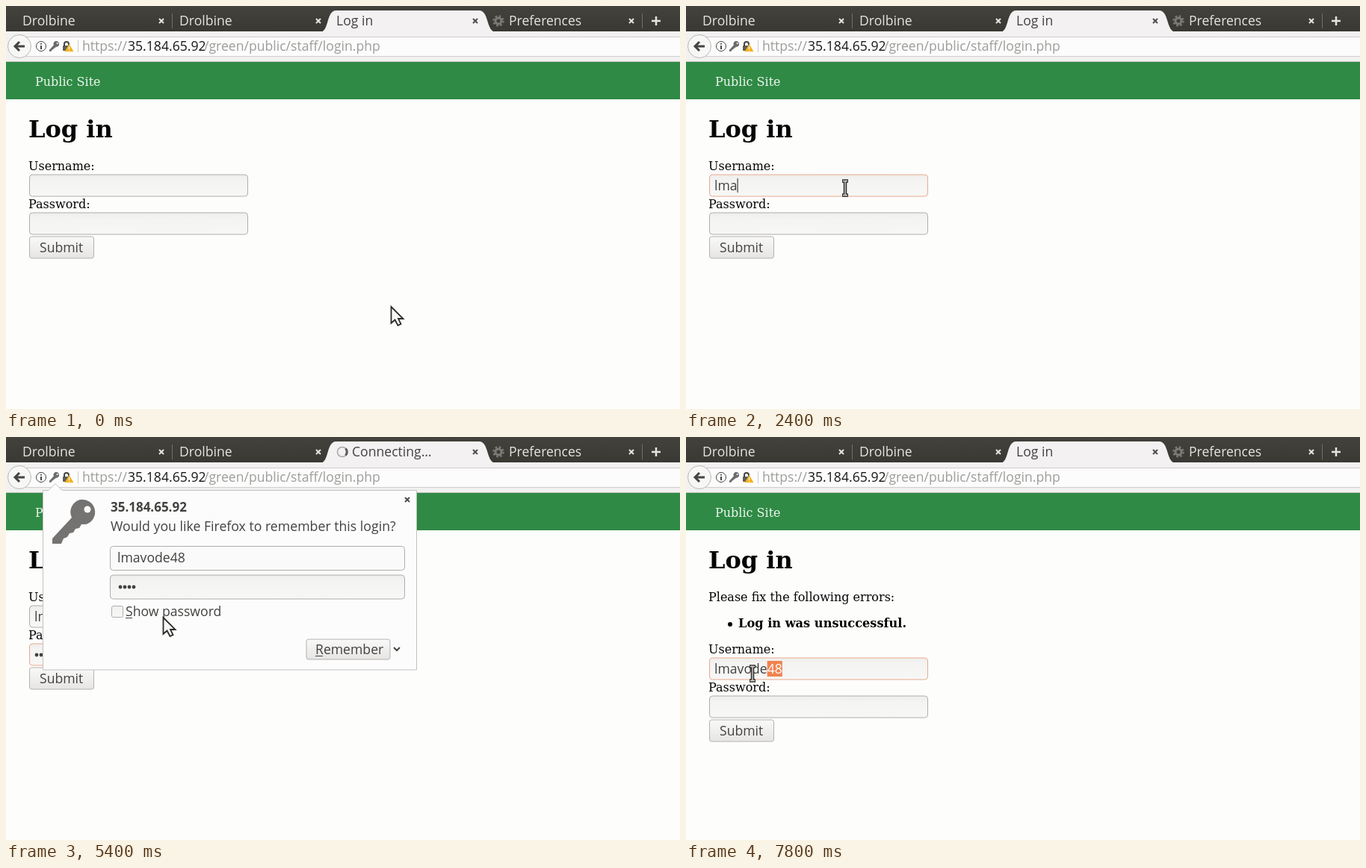
Write an HTML page that moves like this. It is 902 by 540 pixels and loops after 8 s.

```html
<!DOCTYPE html>
<html lang="en">
<head>
<meta charset="utf-8">
<title>Log in</title>
<style>
  html, body { margin: 0; width: 100%; height: 100%; overflow: hidden; background: #fdfdfc; }
  svg { display: block; width: 902px; height: 540px; }
  text { white-space: pre; }
  .ui { font: 17.6px "Open Sans", "Noto Sans", sans-serif; fill: #434240; }
  .page { font: 16px "DejaVu Serif", "Noto Serif", serif; fill: #050505; }
  .bold { font-weight: bold; }
  .light { fill: #e6e4df; }
  .faint { fill: #9e9d9a; }
  .box { fill: url(#fieldFill); stroke: #b0aeab; }
  .focus { stroke: #eaa98b; }
  .button { fill: url(#buttonFill); stroke: #b5b3b0; }
  .line { fill: none; stroke: #454442; stroke-width: 2; }
  .thin { stroke-width: 1; }
  .thick { stroke-width: 3; }
</style>
</head>
<body>
<svg viewBox="0 0 902 540">
  <defs>
    <linearGradient id="barFill" x2="0" y2="1">
      <stop stop-color="#43423c"/><stop offset="1" stop-color="#393833"/>
    </linearGradient>
    <linearGradient id="toolFill" x2="0" y2="1">
      <stop stop-color="#f3f1f2"/><stop offset="1" stop-color="#f2f1f0"/>
    </linearGradient>
    <linearGradient id="fieldFill" x2="0" y2="1">
      <stop stop-color="#eeeeec"/><stop offset=".3" stop-color="#f4f4f3"/><stop offset="1" stop-color="#f7f7f6"/>
    </linearGradient>
    <linearGradient id="buttonFill" x2="0" y2="1">
      <stop stop-color="#f9f9f8"/><stop offset="1" stop-color="#e6e5e3"/>
    </linearGradient>
    <path id="cross" d="M-3 -3L3 3M3 -3L-3 3"/>
    <g id="keyShape">
      <path d="M6 -30A17 17 0 0 1 14 3L8 3L5 8L0 9L-3 14L-8 15L-11 20L-16 22L-19 29H-31V22L-5 -6A17 17 0 0 1 6 -30Z"/>
      <circle cx="16" cy="-17" r="4.500" fill="#fcfcfc"/>
    </g>
  </defs>

  <rect width="902" height="540" fill="#fdfdfc"/>

  <!-- Tab strip -->
  <rect width="902" height="35" fill="url(#barFill)"/>
  <path d="M420 35C433 35 428 6 442 6H633C647 6 642 35 656 35Z" fill="#f3f1f2"/>
  <path d="M222.500 10V30M851.500 10V30" stroke="#6f6e69"/>
  <g class="ui">
    <text class="light" x="22" y="26">Drolbine</text>
    <text class="light" x="232" y="26">Drolbine</text>
    <text id="tabTitle" y="26"></text>
    <text class="light" x="673" y="26">Preferences</text>
  </g>
  <g stroke="#e6e4df" stroke-width="2">
    <use href="#cross" x="208" y="20"/>
    <use href="#cross" x="418" y="20"/>
    <use href="#cross" x="837" y="20"/>
    <use href="#cross" x="628" y="20" stroke="#4f4e4b"/>
    <path d="M864 20H876M870 14V26" stroke-width="2.500"/>
  </g>
  <g fill="none" stroke="#7b7a77">
    <circle cx="659" cy="20" r="4" stroke-width="3"/>
    <circle cx="659" cy="20" r="6.500" stroke-width="2.500" stroke-dasharray="2.500 2.605"/>
  </g>
  <g id="spinner" fill="none">
    <circle r="6.500" stroke="#a9a8a6" stroke-width="1.500"/>
    <path d="M4.500 -4.500A6.500 6.500 0 0 1 4.500 4.500" stroke="#5b5a58" stroke-width="3"/>
  </g>

  <!-- Address bar -->
  <rect y="34" width="902" height="41" fill="url(#toolFill)"/>
  <rect x="26" y="41.500" width="890" height="26" fill="#fcfcfc" stroke="#d0cecb"/>
  <path d="M0 74.500H902" stroke="#c4c3c0"/>
  <circle cx="18" cy="54" r="15.500" fill="#f7f7f6" stroke="#bab8b5"/>
  <path d="M25 54H13M18 48L12 54L18 60" class="line thick"/>
  <circle cx="47" cy="54" r="6.500" class="line thin"/>
  <path d="M47 53V58M47 50V51.500" class="line"/>
  <use href="#keyShape" transform="translate(65 54) scale(.23)" fill="#6d6c6a"/>
  <rect x="76" y="53" width="10" height="7" rx="1" fill="#5f5e5c"/>
  <path d="M78 54V51A3 3 0 0 1 84 51V54" class="line"/>
  <path d="M84.500 51L90.500 61H78.500Z" fill="#f2b01e"/>
  <path d="M84.500 54V58M84.500 59V60" stroke="#fff"/>
  <path d="M96.500 46V62" stroke="#cccac8"/>
  <g class="ui">
    <text class="faint" x="102" y="60">https://</text>
    <text x="163" y="60" style="fill:#181817">35.184.65.92</text>
    <text class="faint" x="265" y="60">/green/public/staff/login.php</text>
  </g>

  <!-- Page -->
  <rect y="75" width="902" height="50" fill="#2f8a45"/>
  <g class="page">
    <text x="39" y="107" style="fill:#eef6ee">Public Site</text>
    <text class="bold" x="30" y="176" style="font-size:32px">Log in</text>
    <g id="errors">
      <text x="30" y="220">Please fix the following errors:</text>
      <circle cx="59" cy="251" r="3"/>
      <text class="bold" x="70" y="255" style="font-size:16.200px">Log in was unsuccessful.</text>
    </g>
  </g>
  <g id="form">
    <text class="page" x="30" y="220">Username:</text>
    <rect id="userBox" class="box" x="31.500" y="226" width="292" height="29" rx="4"/>
    <rect id="selection" y="230" height="21" fill="#f0834f"/>
    <text id="user" class="ui" x="38" y="247"></text>
    <text class="page" x="30" y="271">Password:</text>
    <rect id="passBox" class="box" x="31.500" y="277" width="292" height="29" rx="4"/>
    <g id="dots" fill="#434240"></g>
    <rect class="button" x="31.500" y="309" width="86" height="29" rx="3"/>
    <text class="ui" x="45" y="330">Submit</text>
    <path id="caret" d="M0 0V19" stroke="#1c1c1b"/>
  </g>

  <!-- Password prompt -->
  <g id="prompt" class="ui">
    <path d="M49.500 71.500H57L66 62.500L75 71.500H549.500V312H49.500Z" fill="#fcfcfc" stroke="#c3c2bf"/>
    <use href="#keyShape" x="93" y="114" fill="#747372"/>
    <text class="bold" x="140" y="100" style="font-size:17px">35.184.65.92</text>
    <text x="140" y="126" style="font-size:17.700px">Would you like Firefox to remember this login?</text>
    <use href="#cross" x="537" y="84" stroke="#4f4e4b" stroke-width="2"/>
    <rect x="139.500" y="146.500" width="394" height="32" rx="4" class="box" style="fill:#fafafa"/>
    <text id="savedUser" x="149" y="168"></text>
    <rect x="139.500" y="185" width="394" height="32" rx="4" class="box"/>
    <g id="savedDots" fill="#434240"></g>
    <rect x="141.500" y="226.500" width="15" height="15" rx="2" class="box"/>
    <text x="160" y="240">Show password</text>
    <rect x="402" y="271" width="112" height="27" rx="3" class="button"/>
    <text x="414" y="291">Remember</text>
    <path d="M160 242.500H169M414 293.500H424" class="line thin"/>
    <path d="M519 282L523 286L527 282" class="line"/>
  </g>

  <path id="arrow" d="M0 0V22L5 17.500L9 25L13 23L9.500 16H16Z" fill="#f8f8f6" stroke="#2b2b28" stroke-width="1.800"/>
  <g id="beam" fill="none">
    <path d="M-4 -9.500H4M0 -9.500V9.500M-4 9.500H4" stroke="#30302d" stroke-width="4.500"/>
    <path d="M-3 -9.500H3M0 -9.500V9.500M-3 9.500H3" stroke="#dddcd9" stroke-width="1.300"/>
  </g>
</svg>
<script>
const LOOP = 8000, STEP = 200;
const USER = "lmavode48";
const CLICK = 1400, TYPE_USER = 2000, TYPE_PASS = 3800, SEND = 4800;
const PROMPT = [5000, 6200], LOADED = 6600, DRAG = 7400;

// time, x, y of the mouse
const path = [
  [0, 518, 405], [200, 508, 398], [800, 292, 254], [1200, 213, 244],
  [6600, 213, 244], [7400, 129, 313], [7800, 89, 317]
];

const el = {};
document.querySelectorAll("[id]").forEach(node => el[node.id] = node);
const show = (node, on) => node.style.display = on ? "" : "none";
const place = (node, x, y, turn = 0) =>
  node.setAttribute("transform", `translate(${x} ${y}) rotate(${turn})`);
const typed = (t, start, max) =>
  Math.max(0, Math.min(max, Math.floor((t - start) / STEP) + 1));
const between = (t, [from, to]) => t >= from && t < to;

function dotRow(count, x, y) {
  return Array.from({ length: count }, (_, i) =>
    `<circle cx="${x + i * 6}" cy="${y}" r="2.400"/>`).join("");
}

function mouseAt(t) {
  const next = path.findIndex(point => point[0] > t);
  if (next < 0) return path[path.length - 1].slice(1);
  const [t0, x0, y0] = path[next - 1], [t1, x1, y1] = path[next];
  const k = (t - t0) / (t1 - t0);
  return [x0 + (x1 - x0) * k, y0 + (y1 - y0) * k];
}

function drawMouse(t, prompting, shift) {
  const [x, y] = mouseAt(t);
  const inRow = top => y >= top + shift && y <= top + 30 + shift;
  const overField = !prompting && x > 31 && x < 324 && (inRow(225) || inRow(276));
  show(el.beam, overField);
  show(el.arrow, !overField);
  place(el.beam, x, y);
  place(el.arrow, x - 2.5, y - 2);
}

function drawForm(t, loaded) {
  const letters = typed(t, TYPE_USER, USER.length);
  const dots = loaded ? 0 : typed(t, TYPE_PASS, 4);
  const inPass = t >= TYPE_PASS && !loaded;
  const inUser = between(t, [CLICK, TYPE_PASS]) || t >= DRAG;
  el.user.textContent = USER.slice(0, letters);
  el.dots.innerHTML = dotRow(dots, 41, 292);
  el.userBox.classList.toggle("focus", inUser);
  el.passBox.classList.toggle("focus", inPass);

  const width = letters ? el.user.getComputedTextLength() : 0;
  show(el.caret, between(t, [CLICK, SEND]));
  place(el.caret, inPass ? 38.5 + dots * 6 : 38.5 + width, inPass ? 282 : 231);

  const picked = t > DRAG ? Math.floor((t - DRAG) / STEP) : 0;
  show(el.selection, picked > 0);
  if (picked) {
    const first = USER.length - picked;
    const left = el.user.getStartPositionOfChar(first).x;
    el.selection.setAttribute("x", left);
    el.selection.setAttribute("width", 38 + width - left);
    el.user.innerHTML = `${USER.slice(0, first)}<tspan fill="#fff">${USER.slice(first)}</tspan>`;
  }
}

function render(now) {
  const t = Math.floor(now % LOOP / STEP) * STEP;
  const loaded = t >= LOADED, connecting = between(t, [SEND, LOADED]);
  const prompting = between(t, PROMPT), shift = loaded ? 70 : 0;
  el.tabTitle.textContent = connecting ? "Connecting…" : "Log in";
  el.tabTitle.setAttribute("x", connecting ? 463 : 442);
  show(el.spinner, connecting);
  place(el.spinner, 450, 20, (5400 - t) * 0.4);
  show(el.prompt, prompting);
  show(el.errors, loaded);
  place(el.form, 0, shift);
  drawForm(t, loaded);
  drawMouse(t, prompting, shift);
}

el.savedUser.textContent = USER;
el.savedDots.innerHTML = dotRow(4, 153, 201);
const start = performance.now();
function tick() {
  render(performance.now() - start);
  requestAnimationFrame(tick);
}
tick();
</script>
</body>
</html>
```
